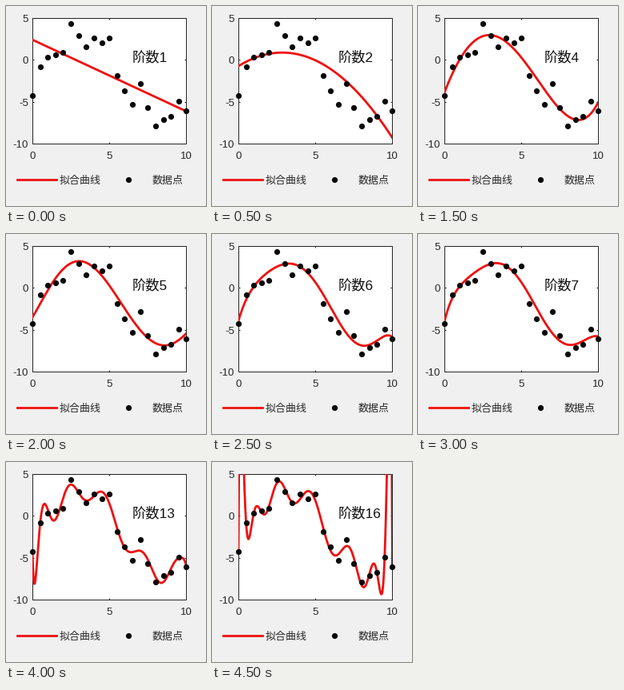
A matplotlib script for the animation above (5500 ms loop, 250 px wide and 250 px high).

```python
import numpy as np
import matplotlib.pyplot as plt
from matplotlib.animation import FuncAnimation
from numpy.polynomial import Polynomial

SIZE, DPI = 250, 100
PX = 72 / DPI  # points per pixel
INK, RED, DOT = "#262626", "#f01010", "#080808"
LEFT, TOP, RIGHT, BOTTOM = 33, 15, 225.4, 172.4
X_MAX, Y_MIN, Y_MAX, STEP = 10, -10, 5, 5
LEGEND_Y = 217

plt.rcParams["font.family"] = ["Liberation Sans", "Noto Sans CJK JP"]

# Single steps first, then jumps of three; the last degree is held twice.
degrees = [*range(1, 8), *range(10, 17, 3)]
n_frames = len(degrees) + 1

# Measured samples at even spacing
y = np.array([-4.2, -0.84, 0.32, 0.58, 0.93, 4.38, 2.92, 1.58, 2.64, 2.02,
              2.6, -1.82, -3.7, -5.25, -2.78, -5.65, -7.87, -7.12, -6.68,
              -4.92, -6.1])
x = np.linspace(0, X_MAX, len(y))
xs = np.linspace(0, X_MAX, 1001)

fig = plt.figure(figsize=(SIZE / DPI, SIZE / DPI), dpi=DPI, facecolor="#f0f0f0")

# Overlay in pixel units, y pointing down
page = fig.add_axes([0, 0, 1, 1], zorder=2)
page.set(xlim=(0, SIZE), ylim=(SIZE, 0))
page.axis("off")


def label(px, py, text, size, color=INK, **kw):
    return page.text(px, py, text, fontsize=size * PX, color=color, **kw)


ax = fig.add_axes([LEFT / SIZE, 1 - BOTTOM / SIZE,
                   (RIGHT - LEFT) / SIZE, (BOTTOM - TOP) / SIZE])
xticks = range(0, X_MAX + 1, STEP)
yticks = range(Y_MIN, Y_MAX + 1, STEP)
ax.set(xlim=(0, X_MAX), ylim=(Y_MIN, Y_MAX), xticks=xticks, yticks=yticks)
ax.tick_params(direction="in", length=2 * PX, width=PX, color=INK,
               top=True, right=True, labelbottom=False, labelleft=False)
for spine in ax.spines.values():
    spine.set(linewidth=PX, color=INK)

for v in xticks:
    px = LEFT + (RIGHT - LEFT) * v / X_MAX
    label(px, BOTTOM + 19, str(v), 13.3, ha="center")
for v in yticks:
    py = TOP + (BOTTOM - TOP) * (Y_MAX - v) / (Y_MAX - Y_MIN)
    label(LEFT - 5, py + 4.6, str(v), 13.3, ha="right")

stroke = dict(color=RED, lw=2.8 * PX)
dots = dict(ls="none", marker="o", ms=7.2 * PX, mew=0, color=DOT)
curve, = ax.plot([], [], zorder=3, **stroke)
ax.plot(x, y, clip_on=False, zorder=5, **dots)

page.plot([14, 63], [LEGEND_Y, LEGEND_Y], **stroke)
page.plot([152.5], [LEGEND_Y], **dots)
label(67, LEGEND_Y + 5, "拟合曲线", 13, weight="light")
label(183, LEGEND_Y + 5, "数据点", 13, weight="light")
title = label(158, 69, "", 17.3, color="#101010", weight="light")


def draw(i):
    degree = degrees[min(i, len(degrees) - 1)]
    curve.set_data(xs, Polynomial.fit(x, y, degree)(xs))
    title.set_text(f"阶数{degree}")
    return curve, title


anim = FuncAnimation(fig, draw, frames=n_frames, interval=500,
                     repeat=True, repeat_delay=0)
plt.show()
```
